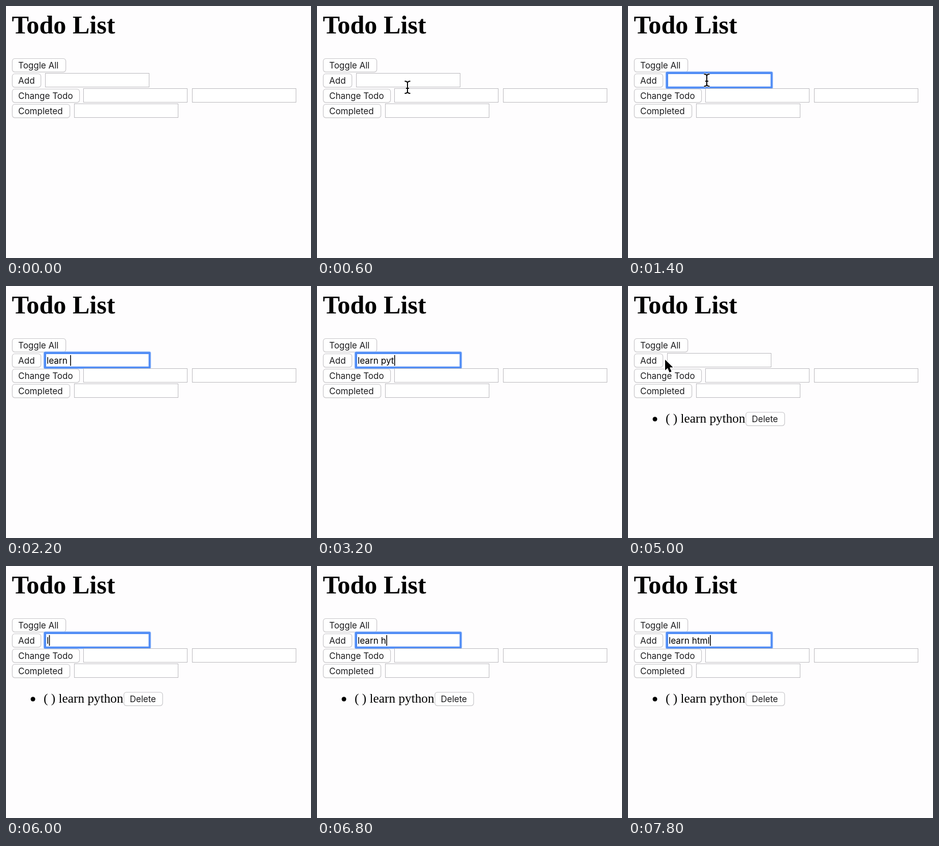
Write an HTML page with a canvas that moves like this. It is 600 by 496 pixels and loops after 8 s.

```html
<!DOCTYPE html>
<html lang="en">
<head>
<meta charset="utf-8">
<title>Todo List</title>
<style>
  html, body { margin: 0; width: 100%; height: 100%; overflow: hidden; background: #fefdfe; }
  canvas { display: block; }
</style>
</head>
<body>
<canvas id="stage" width="600" height="496"></canvas>
<script>
const ctx = document.getElementById('stage').getContext('2d');
const LOOP = 8000;
const SANS = 'Inter, sans-serif';
const SERIF = '"Liberation Serif", serif';

// Each step keeps the previous state except for the listed changes.
const steps = [
  [0, { text: '', caret: false, focus: false, list: false, pointer: null }],
  [200, { pointer: ['arrow', 314, 275] }],
  [400, { pointer: ['beam', 232, 211] }],
  [600, { pointer: ['beam', 178, 160] }],
  [800, { pointer: ['beam', 155, 146] }],
  [1000, { focus: true, caret: true }],
  [1400, { caret: false }],
  [1800, { text: 'le', caret: true, pointer: null }],
  [2000, { text: 'lear' }],
  [2200, { text: 'learn ' }],
  [2800, { caret: false }],
  [3000, { text: 'learn py', caret: true }],
  [3200, { text: 'learn pyt' }],
  [3400, { text: 'learn pyth' }],
  [3600, { text: 'learn python' }],
  [4200, { caret: false, pointer: ['beam', 136, 145] }],
  [4400, { pointer: ['beam', 71, 133] }],
  [4600, { pointer: ['arrow', 47, 141] }],
  [4800, { text: '', focus: false, list: true }],
  [5000, { pointer: ['arrow', 73, 145] }],
  [5200, { focus: true, caret: true, pointer: ['beam', 83, 142] }],
  [5800, { caret: false }],
  [6000, { text: 'l', caret: true, pointer: null }],
  [6200, { text: 'le' }],
  [6400, { text: 'lear' }],
  [6600, { text: 'learn ' }],
  [6800, { text: 'learn h' }],
  [7200, { caret: false }],
  [7400, { text: 'learn ht', caret: true }],
  [7600, { text: 'learn htm' }],
  [7800, { text: 'learn html' }]
];

const arrow = new Path2D('M0 0V21L5 16.5L8.5 25L12.5 23.3L9 15.2H15.5Z');
const beam = new Path2D('M-5.5-12Q0-12 0-8Q0-12 5.5-12M0-8V8M-5.5 12Q0 12 0 8Q0 12 5.5 12M-3 2H3');

function stateAt(time) {
  return Object.assign({}, ...steps.filter(([start]) => start <= time).map(([, change]) => change));
}

function write(text, x, y, font, color = '#000') {
  ctx.font = font;
  ctx.fillStyle = color;
  ctx.fillText(text, x, y);
}

function roundBox(x, y, w, h, r, color) {
  ctx.fillStyle = color;
  ctx.beginPath();
  ctx.roundRect(x, y, w, h, r);
  ctx.fill();
}

function button(label, x, y, w) {
  roundBox(x - 0.5, y, w + 1, 28, 6, '#e7e6e8');
  roundBox(x, y, w, 27.3, 5.5, '#c6c5c8');
  roundBox(x + 1, y + 1, w - 2, 25.3, 4.5, '#fff');
  write(label, x + 12, y + 20.3, '17px ' + SANS, '#1c1c1e');
}

function field(x, y) {
  ctx.fillStyle = '#fff';
  ctx.fillRect(x, y, 205, 28);
  ctx.strokeStyle = '#b9b8bc';
  ctx.lineWidth = 1;
  ctx.strokeRect(x + 0.5, y + 0.5, 204, 27);
}

function addField({ text, caret, focus }) {
  field(77, 132);
  if (focus) {
    roundBox(73.5, 128.5, 212, 35, 3, '#c9dcfb');
    roundBox(74.5, 129.5, 210, 33, 2.5, '#518df5');
    roundBox(79, 134, 201.5, 24.5, 0, '#fff');
  }
  write(text, 80, 153, '17.2px ' + SANS);
  if (caret) ctx.fillRect(80.5 + ctx.measureText(text).width, 136, 1.6, 21);
}

function drawPointer([kind, x, y]) {
  ctx.save();
  ctx.translate(x, y);
  ctx.lineJoin = 'round';
  ctx.strokeStyle = '#fff';
  if (kind === 'arrow') {
    ctx.lineWidth = 3;
    ctx.stroke(arrow);
    ctx.fillStyle = '#000';
    ctx.fill(arrow);
  } else {
    ctx.lineWidth = 4;
    ctx.stroke(beam);
    ctx.strokeStyle = '#000';
    ctx.lineWidth = 2;
    ctx.stroke(beam);
  }
  ctx.restore();
}

function draw(state) {
  ctx.fillStyle = '#fefdfe';
  ctx.fillRect(0, 0, 600, 496);
  write('Todo List', 11.5, 54, 'bold 50.2px ' + SERIF);

  button('Toggle All', 12, 103, 106);
  button('Add', 12, 133, 57);
  addField(state);
  button('Change Todo', 12, 163, 133);
  field(152, 162);
  field(366, 162);
  button('Completed', 12, 193, 114);
  field(134, 192);

  if (state.list) {
    roundBox(48.5, 257.5, 9, 9, 4.5, '#000');
    write('( ) learn python', 74, 269, '25.3px ' + SERIF);
    button('Delete', 231.5, 248, 77);
  }
  if (state.pointer) drawPointer(state.pointer);
}

function frame() {
  draw(stateAt(performance.now() % LOOP));
  requestAnimationFrame(frame);
}
frame();
</script>
</body>
</html>
```
